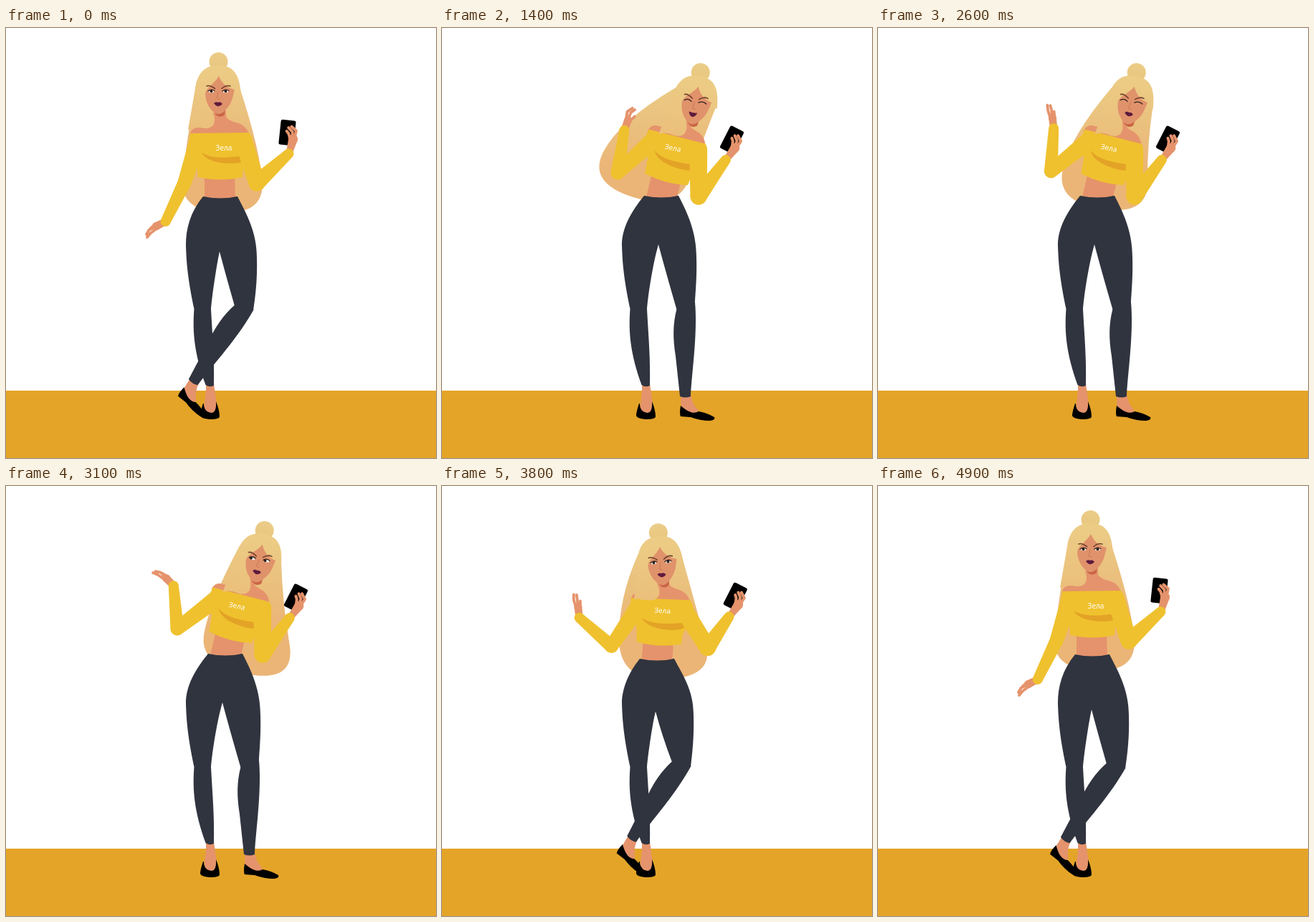
These frames come from a looping animation (600 px wide and 600 px high, 5 s). An HTML page with a canvas:

```html
<!DOCTYPE html>
<html lang="ru">
<head>
<meta charset="utf-8">
<style>
html, body { margin: 0; width: 100%; height: 100%; overflow: hidden; background: #fff; }
canvas { display: block; width: 600px; height: 600px; }
</style>
</head>
<body>
<canvas id="stage" width="600" height="600"></canvas>
<script>
const ctx = document.getElementById('stage').getContext('2d');
const LOOP = 5000, STEP = 100, FOREARM = 60;
const SKIN = '#e5936c', YELLOW = '#efc12e', FOLD = '#e3a326', PANTS = '#30343f', FLOOR = '#e4a428';

// Body: head x y angle | torso x y angle | waist x y | crotch x y | hip x |
// knee x y, shin angle | elbow x y | phone x y angle | label x y angle
const front = [296,106,0, 298,178,0, 275,235, 298,312, 350, 332,390,34, 350,216, 392.5,146,6, 304,168,0];
const lean  = [350,120,10, 320,182,15, 282,234, 302,302, 355, 340,388,0, 358,235, 404.5,156,27, 322,168,12];
const dip   = [323,136,-4, 311,197,9, 277,243, 298,314, 352, 336,383,32.5, 383,241, 441,177.5,57, 314,182,8];
const rise  = [290,112,-6, 296,181,-3, 275,239, 298,315, 350, 332,392,34, 358,210, 377.5,131,-3, 301,167,-1];
const bodyTrack = [[0, front], [500, front], [1150, lean], [3100, lean], [3500, dip], [4100, rise], [4700, front], [LOOP, front]];

// Free arm: elbow x y | forearm angle | hand angle | finger curl
const hang = [249,216, 116, 153,-1];
const side = [245,228, 168, 225,-1];
const up = [245,202, 279, 290,1];
const touch = [245,201, 287, 320,1];
const out = [239,199, 265, 226,-1];
const raised = [228,219, 275, 302,1];
const armTrack = [[0, hang], [500, hang], [850, side], [1400, up], [1700, up], [2200, touch], [2900, out], [3100, out],
  [3500, raised], [4100, side], [4700, hang], [LOOP, hang]];

// Hair: four control points, from the left side round to the right
const hairRest = [250,170, 243,255, 360,260, 355,172];
const hairFlung = [247,130, 203,216, 330,256, 362,160];
const hairBack = [255,138, 225,235, 350,250, 364,165];
const hairRight = [285,160, 268,250, 405,275, 386,165];
const hairDip = [250,155, 295,285, 414,268, 380,178];
const hairLeft = [243,155, 200,260, 345,265, 335,180];
const hairOver = [255,170, 250,255, 378,258, 362,172];
const hairTrack = [[0, hairRest], [700, hairRest], [1300, hairFlung], [1600, hairFlung], [2200, hairBack], [3000, hairRight],
  [3150, hairRight], [3500, hairDip], [4100, hairLeft], [4600, hairOver], [4900, hairRest], [LOOP, hairRest]];

function sample(track, t) {
  const i = track.findIndex(key => key[0] > t);
  const [t0, a] = track[i - 1], [t1, b] = track[i];
  const u = (t - t0) / (t1 - t0), k = u * u * (3 - 2 * u);
  return a.map((v, n) => v + (b[n] - v) * k);
}

const rad = deg => deg * Math.PI / 180;

function point([x, y, deg], dx, dy) {
  const c = Math.cos(rad(deg)), s = Math.sin(rad(deg));
  return [x + dx * c - dy * s, y + dx * s + dy * c];
}

function place([x, y, deg], px, py, draw) {
  ctx.save();
  ctx.translate(x, y);
  ctx.rotate(rad(deg));
  ctx.translate(-px, -py);
  draw();
  ctx.restore();
}

function fill(d, color) {
  ctx.fillStyle = color;
  ctx.fill(new Path2D(d));
}

function line(d, color, width) {
  ctx.strokeStyle = color;
  ctx.lineWidth = width;
  ctx.lineCap = ctx.lineJoin = 'round';
  ctx.stroke(new Path2D(d));
}

function disc(x, y, r, color) {
  ctx.fillStyle = color;
  ctx.beginPath();
  ctx.arc(x, y, r, 0, 7);
  ctx.fill();
}

function limb([x1, y1], r1, [x2, y2], r2, color) {
  const a = Math.atan2(y2 - y1, x2 - x1), c = Math.cos(a), s = Math.sin(a);
  disc(x1, y1, r1, color);
  disc(x2, y2, r2, color);
  fill(`M${x1 - s * r1} ${y1 + c * r1}L${x2 - s * r2} ${y2 + c * r2}
    L${x2 + s * r2} ${y2 - c * r2}L${x1 + s * r1} ${y1 - c * r1}Z`, color);
}

function shade(y0, top, y1, bottom) {
  const g = ctx.createLinearGradient(0, y0, 0, y1);
  g.addColorStop(0, top);
  g.addColorStop(1, bottom);
  return g;
}

function drawBackHair(head, [ax, ay, bx, by, cx, cy, dx, dy]) {
  const left = point(head, -30, -32), right = point(head, 31, -20), top = point(head, 0, -48);
  fill(`M${left}Q${ax} ${ay} ${(ax + bx) / 2} ${(ay + by) / 2}Q${bx} ${by} ${(bx + cx) / 2} ${(by + cy) / 2}
    Q${cx} ${cy} ${(cx + dx) / 2} ${(cy + dy) / 2}Q${dx} ${dy} ${right}L${top}Z`,
    shade(head[1] - 30, '#eac983', head[1] + 75, '#ebb577'));
}

function drawLegs([wx, wy], [cx, cy], hipX, knee) {
  fill('M279 496L290 496L294 525Q294 538 286 538Q276 538 277 525L279 508Z', SKIN);
  fill('M275 524C272 533 271 538 271 541Q272 545 284 546Q298 546 298 542C298 536 296 528 293 521Q294 536 287 537Q276 536 276 524Z', '#000');
  place(knee, 0, 0, () => {
    fill('M-7 122L7 122Q8 135 18 146L8 153L-6 148Z', SKIN);
    fill('M-7 139Q-9 150 -7 154L7 155Q20 160 34 160Q42 159 40 155Q30 149 18 147Q10 152 -2 143Z', '#000');
    fill('M-12.5 4C-18 25 -18 45 -14 70L-8 126Q0 129 7 126C8 100 14 60 14 20Q14 5 13 -5Z', PANTS);
  });
  const outer = point(knee, 13, -4), inner = point(knee, -12.5, 5);
  fill(`M${cx} ${cy}L${wx + 14} ${wy + 8}L${wx + 48} ${wy}C${wx + 61} ${wy + 25} ${hipX} 285 ${hipX} 320
    C${hipX + 1} 350 ${hipX - 2} 375 ${outer}L${inner}Q${cx + 9} ${cy + 34} ${cx} ${cy}Z`, PANTS);
  fill(`M${wx} ${wy}C${wx - 18} ${wy + 22} 251 ${wy + 45} 251 303C252 340 257 365 262.5 392C260 425 263 455 278.5 498
    Q284 502 290 499C291 460 288 430 286 392C288 370 294 330 ${cx} ${cy}L${wx + 48} ${wy}Q${wx + 24} ${wy + 5} ${wx} ${wy}Z`, PANTS);
}

function drawTorso(torso, head, [wx, wy]) {
  const at = (x, y) => point(torso, x - 298, y - 178);
  fill(`M${at(277, 200)}L${at(319, 200)}L${wx + 45} ${wy + 6}L${wx + 2} ${wy + 6}Z`, SKIN);
  fill(`M${point(head, -5, 0)}L${point(head, 10, 0)}L${at(308, 138)}L${at(287, 140)}Z`, SKIN);
  place(torso, 298, 178, () => {
    fill('M256 150Q258 139 268 139Q288 140 292 125L305 122Q310 130 325 133Q336 137 340 150Z', SKIN);
    fill('M257 147L339 146Q345 152 345 165L331 195L330 208Q300 215 268 208L266 185L255 165Z', YELLOW);
    fill('M272 173Q288 186 337 177Q336 188 318 189Q282 190 272 173Z', FOLD);
  });
}

function drawLabel(spot) {
  place(spot, 0, 0, () => {
    ctx.font = '10px "Noto Sans", sans-serif';
    ctx.textAlign = 'center';
    ctx.textBaseline = 'middle';
    ctx.fillStyle = '#fff';
    ctx.fillText('Зела', 0, 0);
  });
}

function drawEye(x, look) {
  ctx.fillStyle = '#fff';
  ctx.beginPath();
  ctx.ellipse(x, 88.5, 3.8, 1.8, 0, 0, 7);
  ctx.fill();
  disc(x + look, 88.3, 2, '#2f211d');
  line(`M${x - 4.5} 88Q${x} 84.5 ${x + 4.5} 87.5`, '#2f211d', 1.3);
}

function drawHead(head, t) {
  const closed = t >= 1000 && t < 2800, smiling = t >= 1000 && t < 1900;
  const look = t >= 2800 && t < 3300 ? -1.8 : 0;
  place(head, 296, 106, () => {
    fill('M290 113L306 113L305 121Q298 127 292 120Z', '#c96545');
    disc(296.5, 47, 13, shade(34, '#ebcd88', 62, '#e8c57c'));
    fill('M296 52C278 52 267 62 264 85L254 142Q264 136 276 140Q292 141 291 126L284 100L310 92Q320 90 328 93C326 65 318 52 296 52Z',
      shade(52, '#eccd86', 140, '#ebbf7b'));
    fill('M297 67C291 78 279 83 278 92C279 105 284 113 291 118Q297 123 304 117C311 110 315 104 317 94L319 86C308 83 301 77 297 67Z', '#e0926b');
    line('M280 81Q284 79 291.5 84.5M301 84.5Q307 79 313 81', '#70412c', 1.6);
    if (closed) line('M281 89Q286 85 291 89M301 89Q307 85 312 89', '#2f211d', 1.3);
    else [286.5, 306.5].forEach(x => drawEye(x, look));
    line('M296 89L294 98Q296 100 298 99', '#c8734f', .8);
    fill(smiling ? 'M290 103.5Q296 105 302 103.5Q300 110 296 110Q292 110 290 103.5Z'
      : 'M290 105Q293 102 296 104Q299 102 302 106Q296 113 290 105Z', '#5e1a3e');
  });
}

function drawPhoneArm(shoulder, elbow, phone) {
  const wrist = point(phone, 5, 29);
  place(phone, 0, 0, () => {
    ctx.fillStyle = '#000';
    ctx.beginPath();
    ctx.roundRect(-10.5, -17.5, 21, 35, 2.5);
    ctx.fill();
    limb([6, 26], 4.5, [9, 8], 6.5, SKIN);
    line('M11 6L12 -4L5 -9M8 6L7 -2L1 -7M5 9L2 1L-1 -2', SKIN, 4);
  });
  limb(shoulder, 12.5, elbow, 11.5, YELLOW);
  limb(elbow, 11.5, wrist, 7, YELLOW);
}

function drawFreeArm(shoulder, [ex, ey, tilt, deg, curl]) {
  const wrist = point([ex, ey, tilt], FOREARM, 0);
  place([...wrist, deg], 0, 0, () => {
    limb([2, 0], 5, [15, 0], 5.5, SKIN);
    line(`M15 -3L26 -5L33 ${-4 + 4 * curl}M16 0L26 0L32 ${4 * curl}M15 3L23 ${4 + 3 * curl}`, SKIN, 3.8);
  });
  limb(shoulder, 12, [ex, ey], 9.5, YELLOW);
  limb([ex, ey], 9.5, wrist, 7, YELLOW);
}

function draw(t) {
  const body = sample(bodyTrack, t);
  const part = (from, count) => body.slice(from, from + count);
  const head = part(0, 3), torso = part(3, 3), waist = part(6, 2);
  ctx.fillStyle = '#fff';
  ctx.fillRect(0, 0, 600, 600);
  ctx.fillStyle = FLOOR;
  ctx.fillRect(0, 506, 600, 94);
  drawBackHair(head, sample(hairTrack, t));
  drawTorso(torso, head, waist);
  drawLegs(waist, part(8, 2), body[10], part(11, 3));
  drawHead(head, t);
  drawPhoneArm(point(torso, 35, -15), part(14, 2), part(16, 3));
  drawFreeArm(point(torso, -31, -18), sample(armTrack, t));
  drawLabel(part(19, 3));
}

function tick() {
  draw(Math.floor(performance.now() % LOOP / STEP) * STEP);
  requestAnimationFrame(tick);
}
tick();
</script>
</body>
</html>
```
